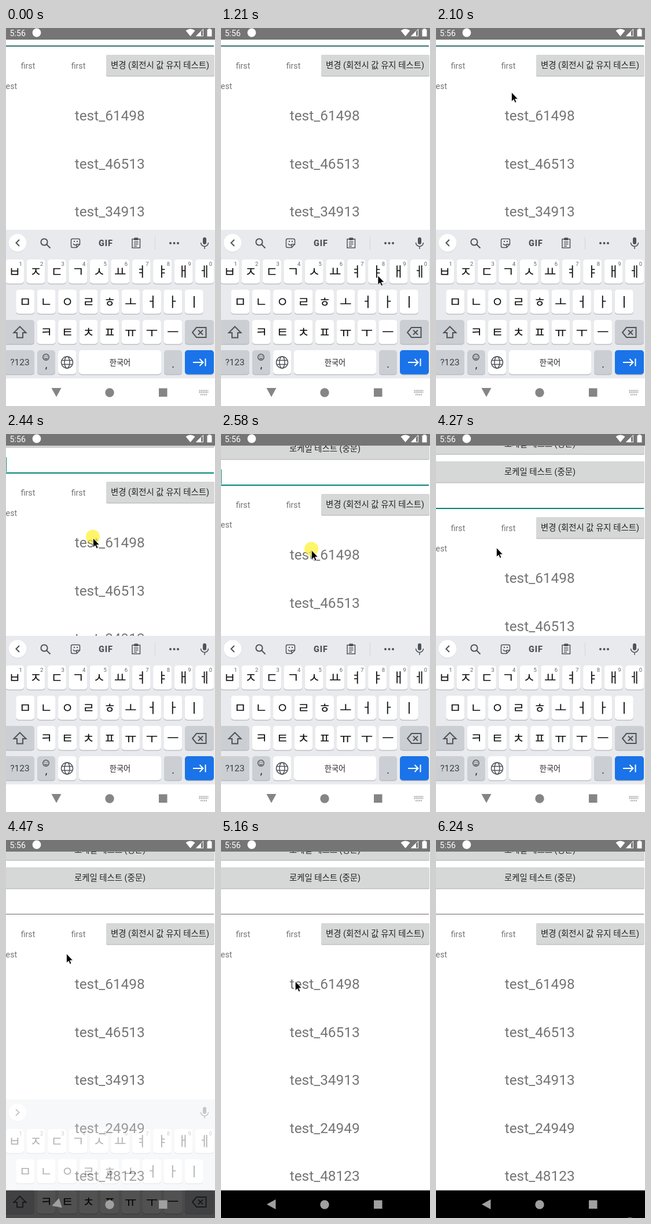
Write an HTML page that moves like this. It is 361 by 650 pixels and loops after 6.37 s.

```html
<!DOCTYPE html>
<html lang="ko">
<head>
<meta charset="utf-8">
<title>Scroll and keyboard</title>
<style>
html, body { margin: 0; width: 100%; height: 100%; overflow: hidden; background: #fff; }
svg { display: block; position: fixed; left: 0; top: 0; }
text { font-family: Roboto, "Noto Sans CJK KR", "Noto Sans CJK", sans-serif; }
.jamo { font-family: "Noto Sans CJK KR", "Noto Sans CJK", sans-serif; }
.icon { fill: none; stroke: #4f5358; stroke-width: 2; }
.thin { stroke-width: 1.5; }
</style>
</head>
<body>
<svg id="stage" width="361" height="650" viewBox="0 0 361 650"></svg>
<script>
const LOOP = 6370;
const stage = document.getElementById('stage');

const text = (x, y, s, size, fill = '#757575', more = 'text-anchor="middle"') =>
  `<text x="${x}" y="${y}" font-size="${size}" fill="${fill}" ${more}>${s}</text>`;
const rect = (x, y, w, h, fill, more = '') =>
  `<rect x="${x}" y="${y}" width="${w}" height="${h}" fill="${fill}" ${more}/>`;
const path = (d, more = 'class="icon"') => `<path d="${d}" ${more}/>`;
const circle = (x, y, r, more = 'class="icon"') => `<circle cx="${x}" cy="${y}" r="${r}" ${more}/>`;
const thin = 'class="icon thin"';

function button(x, y, w, mid, label) {
  return rect(x, y + 1, w, 36.5, '#bfc0c0', 'rx="2"') + rect(x, y, w, 36, '#d6d7d7', 'rx="2"') +
    text(mid, y + 23.4, label, 14.4, '#222');
}

// Keys sit on four rows, 52 px apart
const rowY = row => 398 + 52 * row;
function key(x, row, w, fill = '#fff') {
  const y = rowY(row);
  return rect(x, y + 1.2, w, 41.5, '#b4b7bc', 'rx="5"') + rect(x, y, w, 41.5, fill, 'rx="5"');
}

function keyRow(chars, row) {
  return [...chars].map((c, i) => {
    const x = 179 + (i - (chars.length - 1) / 2) * 36.45, y = rowY(row);
    return key(x - 16, row, 32) +
      text(x, y + 29.4, c, 22.5, '#111', 'class="jamo" text-anchor="middle"') +
      (row ? '' : text(x + 10.3, y + 11, (i + 1) % 10, 9.5, '#5f6368'));
  }).join('');
}

function page() {
  const rows = [61498, 46513, 34913, 24949, 48123];
  return `<g id="page">` +
    ['중문', '영문'].map((s, i) => button(-4, -50 - 48.8 * i, 364, 179.5, `로케일 테스트 (${s})`)).join('') +
    rect(0, 4, 1, 25, '#008577', 'id="caret"') + rect(0, 30, 359, 2, '#008577', 'id="line"') +
    text(38, 70, 'first', 14.2) + text(125, 70, 'first', 14.2) +
    button(173, 46, 187, 266, '변경 (회전시 값 유지 테스트)') +
    text(-0.4, 104.5, 'est', 14.2, '#757575', '') +
    rows.map((n, i) => text(179.2, 159.3 + i * 82.4, 'test_' + n, 24.4)).join('') +
    `</g>`;
}

function toolbar() {
  const dots = [-1, 0, 1].map(i => circle(290.5 + 6.5 * i, 370, 2, 'fill="#4f5358"')).join('');
  return circle(20, 370.4, 15.3, 'fill="#d2d5d9"') + circle(20, 369.5, 15.3, 'fill="#fff"') +
    path('M23 364l-5.5 5.5 5.5 5.5', 'id="chevron" class="icon"') +
    `<g id="tools">` +
    circle(66, 368, 5.6) + path('M70 372l6.5 6.5') +
    path('M115 362.5h10q2.500 0 2.500 2.500v7l-5.500 5.500h-7q-2.500 0-2.500-2.500v-10q0-2.500 2.500-2.500zM127 372h-5v5M116 371q3 4 7 1'.replace(/00\b/g, ''), thin) +
    path('M117 367h2M122 367h2') +
    text(172.4, 374.8, 'GIF', 14.4, '#4f5358', 'text-anchor="middle" font-weight="900" letter-spacing="1"') +
    path('M218 363h13.5v15h-13.5zM221 368h7.5M221 371.5h7.5M221 375h5', thin) +
    rect(221, 360.5, 7.5, 4.5, '#4f5358', 'rx="1.5"') +
    rect(257, 359, 1, 22, '#d3d6da') + dots + `</g>` +
    rect(340, 360, 6, 12, '#4f5358', 'rx="3"') +
    path('M336.5 369a6.5 6.5 0 0 0 13 0M343 375.5v4.5', thin);
}

function keyboard() {
  const grey = '#cbced3';
  return `<g id="keyboard">` + rect(0, 347, 361, 303, '#e8eaed') + toolbar() +
    ['ㅂㅈㄷㄱㅅㅛㅕㅑㅐㅔ', 'ㅁㄴㅇㄹㅎㅗㅓㅏㅣ', 'ㅋㅌㅊㅍㅠㅜㅡ'].map(keyRow).join('') +
    key(-4, 2, 53, grey) + path('M24 513.5L34.5 524H29v8.5H19V524h-5.5z') +
    key(309, 2, 50, grey) + path('M329 515h16.5v17H329l-7-8.5zM332 519.5l8 8m0-8l-8 8') +
    key(-4, 3, 53, grey) + text(24, 580.2, '?123', 15.5, '#3c4043') +
    key(54, 3, 31, grey) + circle(69, 566, 5.2, thin) +
    path('M66.5 567.5q2.5 3 5 0M66.5 564.5h1.5M70 564.5h1.5', thin) + text(69.5, 585, ',', 18, '#222') +
    key(90, 3, 31.5) + circle(105.5, 575, 10, thin) +
    `<ellipse cx="105.5" cy="575" rx="4.5" ry="10" ${thin}/>` +
    path('M96.5 571.5h18M96.5 578.5h18', thin) +
    key(126, 3, 142) + text(197, 580, '한국어', 13.2, '#222') +
    key(273, 3, 31, grey) + text(288.5, 584, '.', 18, '#222') +
    key(309, 3, 50, '#1a73e8') +
    path('M323 575h17M334.5 569l6 6-6 6M344.5 568.5v13', 'fill="none" stroke="#fff" stroke-width="2"') +
    `</g>`;
}

function navIcons() {
  return `<g id="nav">` + path('M-8.5-7.5h17L0 8z', 'id="back"') + circle(179, 627, 7.7, '') +
    path('M264 619.5h14.5v14.5h-14.5z', '') + `</g>` +
    path('M333.5 623.5h16M333.5 626.5h16M336 630.5h11',
      'id="imeIcon" stroke="#a5a5a5" stroke-width="2" stroke-dasharray="2 1"');
}

function statusBar() {
  const white = 'fill="#fff"';
  return rect(0, 0, 361, 20, '#757575') + text(6.5, 13.5, '5:56', 14.2, '#fff', '') +
    circle(53, 8, 7.4, white) +
    path('M310.5 4.5q8-6 16 0l-8 9.7z', white) +
    path('M340.5 2v11.8h-11.8z', 'fill="none" stroke="#fff"') + path('M337 5.2v8.8h-8.8z', white) +
    path('M347.5 2.5h2V1h4v1.5h2v12h-8z', white);
}

stage.innerHTML = rect(0, 0, 361, 650, '#fff') + page() +
  rect(0, 602.5, 361, 48, '#fff', 'id="navBack"') + keyboard() +
  rect(0, 602.5, 361, 48, '#fff', 'id="navFront"') + navIcons() + statusBar() +
  circle(0, -2, 12, 'id="press" fill="#fff022" fill-opacity=".68"') +
  path('M.5.5v16l3.600-3.400 2.400 5.300 2.500-1.100-2.400-5.200h4.900z', 'id="mouse" stroke="#fff" stroke-width=".8"') +
  circle(335, 661, 12, 'id="lastPress" fill="#7c7c78"');

const ids = {};
stage.querySelectorAll('[id]').forEach(e => ids[e.id] = e);
const set = (id, name, value) => ids[id].setAttribute(name, value);
const show = (id, on) => set(id, 'visibility', on ? 'visible' : 'hidden');
const move = (id, x, y, more = '') => set(id, 'transform', `translate(${x} ${y}) ${more}`);

// Progress 0..1 in n equal steps, the first shown at a, the last at b
const steps = (t, a, b, n) =>
  Math.max(0, Math.min(1, (Math.floor((t - a) / (b - a) * (n - 1) + 0.1) + 1) / n));
const soft = u => u * u * (3 - 2 * u);
const out = (u, power) => 1 - (1 - u) ** power;

function pointer(t) {
  let x = 342, y = 640;
  const go = (toX, toY, u) => { x += (toX - x) * u; y += (toY - y) * u; };
  go(199, 210, soft(steps(t, 930, 1550, 10)));
  go(130, 110, soft(steps(t, 1630, 2100, 8)));
  go(160, 213, out(steps(t, 2170, 2720, 9), 1.35));
  go(111, 194, soft(steps(t, 3460, 3600, 3)));
  go(104, 195, soft(steps(t, 3800, 3940, 3)));
  go(333, 652, soft(steps(t, 5090, 5710, 10)));
  return [x, y];
}

// The page follows the pressed pointer, then glides on after release
function scrollAt(t) {
  const dragged = t < 2300 ? 0 : Math.max(0, pointer(Math.min(t, 2900))[1] - 142.5);
  return dragged + 26.5 * out(steps(t, 2920, 3060, 3), 2.4);
}

function draw(t) {
  const [x, y] = pointer(t), scroll = scrollAt(t);
  const hide = steps(t, 4400, 4610, 4), closed = hide > 0;

  move('page', 0, scroll);
  show('caret', t >= 400 && t < 4200 && Math.floor((t - 400) / 508) % 2 === 0);
  set('line', 'height', closed ? 1 : 2);
  set('line', 'fill', closed ? '#666' : scroll ? '#008577' : '#37706a');

  move('keyboard', 0, 198 * hide);
  set('keyboard', 'opacity', (1 - hide) ** 1.65);
  show('tools', !closed);
  set('chevron', 'transform', closed ? 'rotate(180 20 369.5)' : '');

  set('navBack', 'fill', closed ? '#000' : '#fff');
  show('navFront', !closed);
  show('imeIcon', !closed);
  set('nav', 'fill', closed ? '#a0a0a0' : '#858585');
  move('back', 87, 626.5, `rotate(${90 * out(hide, 2.3)})`);

  move('mouse', x, y);
  show('mouse', t >= 930 && t < 5710);
  move('press', x, y);
  show('press', t >= 2300 && t < 2920);
  show('lastPress', t >= 6240);
}

const start = performance.now();
function frame() {
  draw((performance.now() - start) % LOOP);
  requestAnimationFrame(frame);
}
frame();
</script>
</body>
</html>
```
